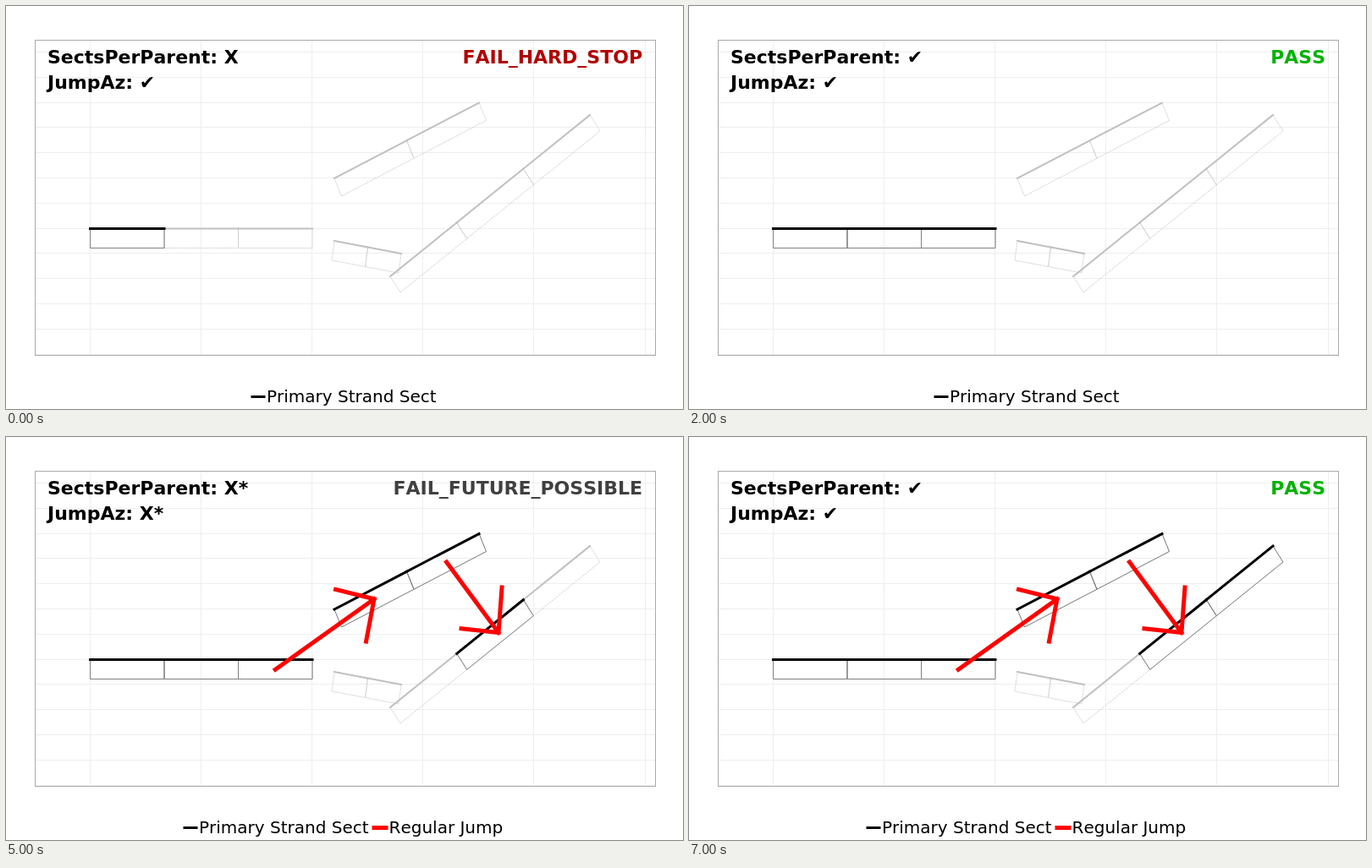
Write an HTML page that moves like this. It is 800x477 px and loops after 8000 ms.

```html
<!DOCTYPE html>
<html lang="en">
<head>
<meta charset="utf-8">
<title>Strand jumps</title>
<style>
  html, body { margin: 0; width: 100%; height: 100%; overflow: hidden; background: #fff; }
  svg { display: block; width: 800px; height: 477px; }
  text { font: 20px "DejaVu Sans", sans-serif; font-kerning: none; white-space: pre; }
  .bold { font-weight: bold; font-size: 22px; }
  #status { text-anchor: end; }
  path { fill: none; }
  .grid { stroke: #eee; }
  .frame { fill: none; stroke: #aaa; }
  .idle-box { stroke: #c0c0c0; stroke-dasharray: 1 1; }
  .idle-top { stroke: #c0c0c0; stroke-width: 2; stroke-linecap: square; }
  .box { stroke: #808080; }
  .top { stroke: #000; stroke-width: 3; stroke-linecap: square; }
  .jump { stroke: #f00; stroke-width: 5; stroke-linecap: square; }
</style>
</head>
<body>
<svg viewBox="0 0 800 477">
  <path class="grid" id="grid"/>
  <rect class="frame" x="34.5" y="40.5" width="733" height="373"/>
  <g id="idle"></g>
  <g id="active"></g>
  <g id="jumps"></g>
  <text class="bold" id="sects" x="49" y="68"></text>
  <text class="bold" id="az" x="49" y="98"></text>
  <text class="bold" id="status" x="752" y="68"></text>
  <g id="legend">
    <path class="top" d="M291 462.5h14"/>
    <text x="308" y="469">Primary Strand Sect</text>
  </g>
  <g id="jumpLegend">
    <path class="jump" d="M435 462.5h14"/>
    <text x="452.5" y="469">Regular Jump</text>
  </g>
</svg>
<script>
const $ = id => document.getElementById(id);
const STEP = 1000, COUNT = 8;

// start, end, offset to the lower edge, [first, last] active step of each section
const strands = [
  { a: [99.5, 263.5], b: [362, 263.5], d: [0, 23], on: [[0, 7], [1, 7], [2, 7]] },
  { a: [388, 204], b: [559, 114.5], d: [8.5, 21], on: [[3, 7], [4, 7]] },
  { a: [388, 278], b: [467, 293], d: [-3, 23], on: [null, null] },
  { a: [454, 320], b: [690, 129], d: [12, 19], on: [[6, 6], [5, 7], [7, 7]] }
];

// tail, tip, two barb ends, first step
const jumps = [
  { tail: [318.2, 275.2], tip: [435, 191.8], barbs: [[389.5, 180.5], [425.5, 242]], from: 3 },
  { tail: [520.5, 148], tip: [582, 231.5], barbs: [[538, 226.7], [586, 178]], from: 5 }
];

const FAIL = ["FAIL_HARD_STOP", "#b20000"];
const WAIT = ["FAIL_FUTURE_POSSIBLE", "#404040"];
const PASS = ["PASS", "#00b200"];
const checks = [
  ["X", "✔", FAIL], ["✔", "✔", PASS], ["✔", "✔", PASS], ["X*", "X*", WAIT],
  ["✔", "✔", PASS], ["X*", "X*", WAIT], ["✔", "X", FAIL], ["✔", "✔", PASS]
];

const timed = [];

function add(parent, name, d, range) {
  const el = document.createElementNS("http://www.w3.org/2000/svg", "path");
  el.setAttribute("class", name);
  el.setAttribute("d", d);
  parent.append(el);
  if (range) timed.push({ el, range });
}

const line = (...pts) => "M" + pts.join("L");
const plus = (p, q) => [p[0] + q[0], p[1] + q[1]];

let grid = "";
for (let i = 0; i < 6; i++) grid += `M${Math.round(99 + i * 131.1) + .5} 41V413`;
for (let i = 0; i < 13; i++) grid += `M35 ${Math.round(54 + i * 29.8) + .5}H767`;
$("grid").setAttribute("d", grid);

for (const { a, b, d, on } of strands) {
  const at = i => a.map((v, k) => v + (b[k] - v) * i / on.length);
  on.forEach((range, i) => {
    const p = at(i), q = at(i + 1);
    const box = line(p, q, plus(q, d), plus(p, d)) + "Z";
    add($("idle"), "idle-box", box);
    add($("idle"), "idle-top", line(p, q));
    if (range) {
      add($("active"), "box", box, range);
      add($("active"), "top", line(p, q), range);
    }
  });
}

for (const { tail, tip, barbs, from } of jumps) {
  const d = [tail, ...barbs].map(p => line(p, tip)).join("");
  add($("jumps"), "jump", d, [from, 7]);
}
timed.push({ el: $("jumpLegend"), range: [3, 7] });

let shown = -1;
function draw(step) {
  const [sects, az, [label, color]] = checks[step];
  $("sects").textContent = "SectsPerParent: " + sects;
  $("az").textContent = "JumpAz: " + az;
  $("status").textContent = label;
  $("status").setAttribute("fill", color);
  $("legend").setAttribute("transform", `translate(${step < 3 ? 0 : -80})`);
  for (const { el, range } of timed) {
    el.style.display = step >= range[0] && step <= range[1] ? "" : "none";
  }
}

function tick() {
  const step = Math.floor(performance.now() / STEP) % COUNT;
  if (step !== shown) draw(shown = step);
  requestAnimationFrame(tick);
}
tick();
</script>
</body>
</html>
```
